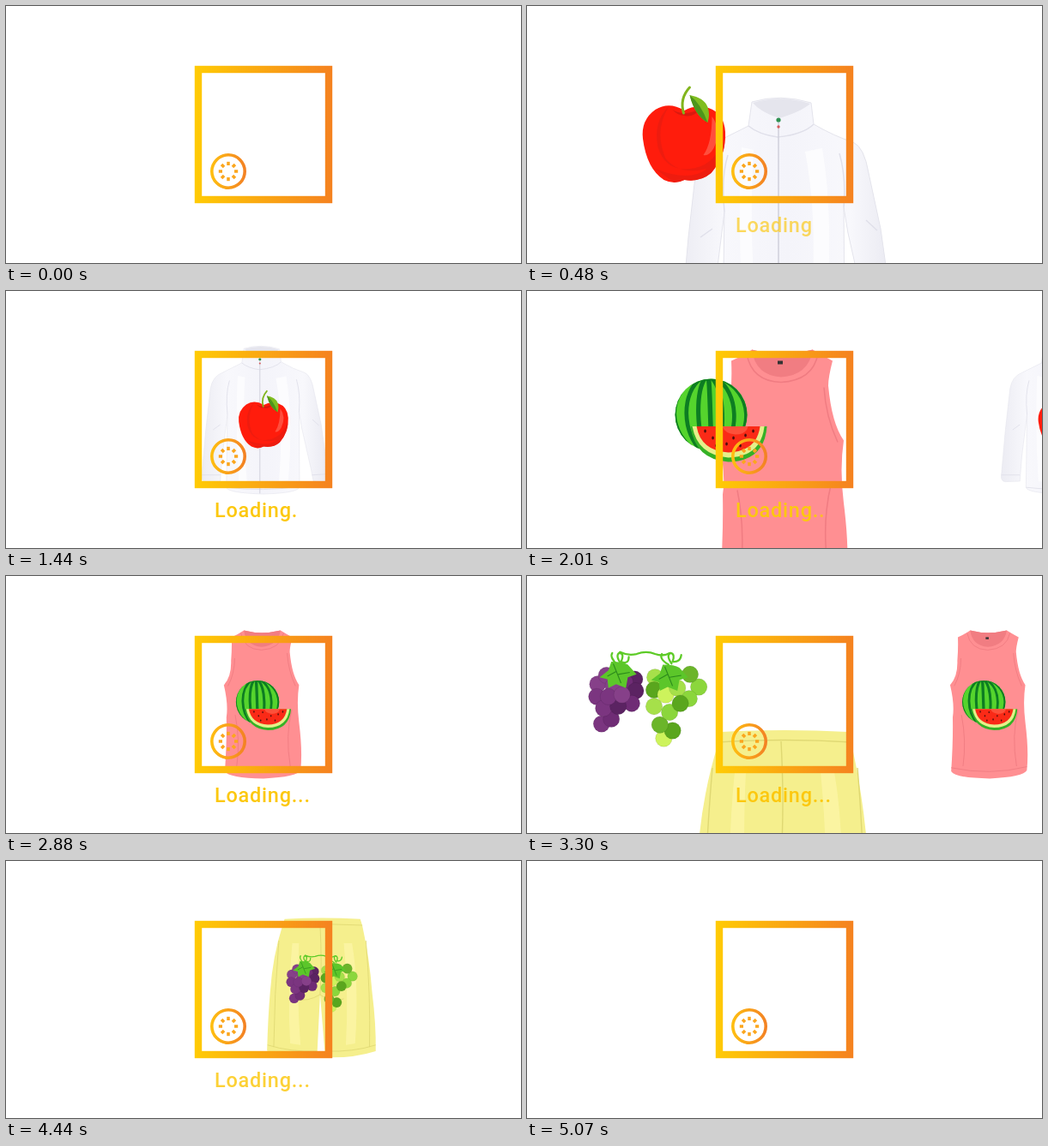
These frames come from a looping animation (600x300 px, 5.39 s). An HTML page:

```html
<!DOCTYPE html>
<html lang="en">
<head>
<meta charset="utf-8">
<title>Loading</title>
<style>
html, body { margin: 0; width: 100%; height: 100%; overflow: hidden; background: #fff; }
svg { display: block; width: 600px; height: 300px; }
text { font: 500 23.5px Roboto, "Open Sans", sans-serif; letter-spacing: .75px; fill: #fcc80f; }
</style>
</head>
<body>
<svg viewBox="0 0 600 300">
  <defs>
    <linearGradient id="gold" gradientUnits="userSpaceOnUse" x1="220" x2="380" y1="0" y2="0">
      <stop offset="0" stop-color="#ffcb05"/><stop offset="1" stop-color="#f58220"/>
    </linearGradient>
    <linearGradient id="ringGold" gradientUnits="userSpaceOnUse" x1="238" x2="280" y1="0" y2="0">
      <stop offset="0" stop-color="#ffc010"/><stop offset="1" stop-color="#f38024"/>
    </linearGradient>
    <linearGradient id="cloth">
      <stop offset="0" stop-color="#ececf3"/><stop offset=".2" stop-color="#f8f8fc"/>
      <stop offset=".5" stop-color="#f4f4fa"/><stop offset=".8" stop-color="#f8f8fc"/>
      <stop offset="1" stop-color="#e9e9f1"/>
    </linearGradient>
    <clipPath id="melonClip"><circle cx="215" cy="145" r="42"/></clipPath>
    <clipPath id="appleClip"><use href="#appleBody"/></clipPath>
  </defs>

  <!-- jacket and apple -->
  <g class="wear">
    <path fill="url(#cloth)" stroke="#e4e4ec" d="M-38-138Q-5-148 31-137L34-112Q58-98 80-91Q93-85 98-55L112 10 126 110Q127 119 118 121L97 120 92 95 74 15 69-15 70 130Q70 143 0 145Q-70 143-72 132L-70-10-80 70-84 120-112 121Q-121 120-120 110L-112 20-103-60Q-99-84-80-91L-42-110Z"/>
    <path fill="#e5e5ed" d="M-37-137Q-5-147 30-136Q20-127-6-119Q-28-126-37-137Z"/>
    <g fill="none" stroke="#e0e0ea" stroke-width="1.5">
      <path d="M-42-110Q-30-100-8-97Q22-100 34-112M-70-10Q-74-50-66-76M69-15Q72-50 64-78M-98 20-84 10M95 0 108 12M-72 132Q0 141 70 130M-120 108-84 108M94 108 126 106"/>
      <path stroke="#cfcfdb" d="M-7-117V144"/>
    </g>
    <path fill="#fff" opacity=".7" d="M-50-85Q-55 0-48 120L-32 122Q-42 10-36-82ZM24-80Q40 0 30 120L48 118Q58 0 44-84Z"/>
    <circle cx="-7" cy="-117" r="2.6" fill="#2e9050"/><circle cx="-7" cy="-109" r="1.7" fill="#d65a5a"/>
  </g>
  <g class="fruit"><g transform="translate(-183.5 -149.5)">
    <path id="appleBody" fill="#ff1c0c" d="M184 122Q166 111 150 121Q133 133 135.500 155Q140 190 160 203Q172 209 184 203Q202 206 215 195Q233 174 231.500 147Q230 125 212 119Q196 115 184 122Z"/>
    <g clip-path="url(#appleClip)">
      <path fill="#e91c10" opacity=".75" d="M166 117Q147 135 153 165Q162 193 190 190Q217 188 229 158L240 205 184 215 150 190Q190 206 210 190Q178 198 162 178Q148 145 166 117Z"/>
      <path fill="#ff5a4a" opacity=".8" d="M216 129Q228 145 218 166Q212 176 206 174Q216 160 216 129Z"/>
      <path fill="#c71710" opacity=".65" d="M170 121Q184 130 204 119Q194 131 184 128Q176 128 170 121Z"/>
    </g>
    <path fill="none" stroke="#82b51d" stroke-width="3" stroke-linecap="round" d="M183 125Q178 108 190 95"/>
    <path fill="#80bd20" d="M190 104Q207 107 211 118Q214 126 211 136Q196 128 190 104Z"/>
    <path fill="#4d951c" d="M190 104Q203 114 211 136Q196 128 190 104Z"/>
  </g></g>

  <!-- tank top and watermelon -->
  <g class="wear">
    <path fill="#ff8f92" d="M-62-131Q-48-137-38-144Q-4-135 33-144Q44-137 56-131Q51-112 51-102Q55-58 69-38Q64-5 69 35Q76 90 72 128Q66 141 0 144Q-68 143-75 130Q-71 70-72 25Q-68 0-77-38Q-62-54-63-85Q-61-110-62-131Z"/>
    <path fill="#f17d82" d="M-38-144Q-4-135 33-144Q28-114-4-112Q-34-114-38-144Z"/>
    <path fill="none" stroke="#f07c82" stroke-width="1.5" d="M-44-139Q-38-107-4-106Q33-108 39-139M-75 123Q0 139 72 121M-69-36Q-56-60-56-90M62-36Q48-66 46-100M-55 20Q-45 70-52 120M55 10Q42 60 52 120"/>
    <rect x="-8" y="-131" width="6" height="4" fill="#333"/>
  </g>
  <g class="fruit"><g transform="translate(-226.5 -151.5)">
    <circle cx="215" cy="145" r="42" fill="#55d42d"/>
    <g id="stripes" clip-path="url(#melonClip)" fill="none" stroke="#0d7d22"></g>
    <path fill="#35b126" d="M191 158.500H280Q277 199 235 200Q196 197 191 158.500Z"/>
    <path fill="#e5f08a" d="M193 158.500H277Q273 194 235 195Q199 192 193 158.500Z"/>
    <path fill="#fa2a17" d="M198 158.500H272Q268 188 235 189Q203 187 198 158.500Z"/>
    <path fill="#ff6b52" opacity=".6" d="M228 158.500H258Q256 168 243 168Q231 167 228 158.500Z"/>
    <g id="seeds" fill="#4a0e0c"></g>
  </g></g>

  <!-- shorts and grapes -->
  <g class="wear">
    <path fill="#f5ef8d" d="M-73-27Q0-31 74-27L78-14Q92 50 97 115Q105 180 104 230Q60 244 6 242L-4 120Q-7 180-10 242Q-60 243-107 229Q-105 160-101 115Q-96 45-77-14Z"/>
    <g fill="none" stroke="#dfd873" stroke-width="1.4">
      <path d="M-77-15Q0-20 78-15M-4-16Q0 60-4 120M-106 218Q-60 232-10 230M6 230Q60 232 104 218M-84 15Q-93 120-94 222M85 15Q94 120 92 222M-4 120Q-30 135-48 128M-4 120Q18 138 42 128"/>
    </g>
    <path fill="#fff9b0" opacity=".6" d="M-58 20Q-68 120-62 215L-42 218Q-50 120-45 20ZM42 20Q52 120 46 218L64 215Q72 100 58 20Z"/>
  </g>
  <g class="fruit"><g transform="scale(1.1325) translate(-300 -142)">
    <g fill="none" stroke="#5dcb27" stroke-width="2" stroke-linecap="round">
      <path d="M271 95Q279 99 288 97Q298 93 307 97Q316 100 322 96M268 108Q260 100 263 96M272 107Q266 99 270 96Q276 96 272 105Q280 108 280 100M321 108Q311 102 314 97M324 107Q318 98 323 96Q328 97 325 105Q333 106 334 98"/>
    </g>
    <g id="grapes"></g>
    <g id="leaf">
      <path fill="#5cc62a" d="M262 105Q274 105 279 108L288 118 279 121 277 132 267 128 259 132 258 123 250 121 259 114Z"/>
      <path fill="none" stroke="#2c8a1c" d="M264 107 272 127M267 115 258 120M269 118 281 116"/>
    </g>
    <use href="#leaf" x="53" y="3"/>
  </g></g>

  <g fill="none">
    <rect x="224" y="74" width="152" height="152" stroke="url(#gold)" stroke-width="8.400"/>
    <circle cx="259" cy="193" r="19.200" stroke="url(#ringGold)" stroke-width="3.600"/>
    <g id="spokes" stroke="#fba61d" stroke-width="3.500"></g>
  </g>
  <text id="label" x="243" y="264">Loading<tspan>.</tspan><tspan>.</tspan><tspan>.</tspan></text>
</svg>
<script>
const $ = id => document.getElementById(id);
const all = sel => [...document.querySelectorAll(sel)];

function add(parent, tag, attrs) {
  const el = document.createElementNS("http://www.w3.org/2000/svg", tag);
  for (const key in attrs) el.setAttribute(key, attrs[key]);
  $(parent).append(el);
}

for (let i = 0; i < 8; i++)
  add("spokes", "path", { d: "M259 181.800V186", transform: `rotate(${i * 45} 259 193)` });

for (let i = -3; i <= 3; i++)
  add("stripes", "path", {
    d: `M${212 + i * 4} 102C${214 + i * 17} 118 ${214 + i * 17} 168 ${216 + i * 5} 189`,
    "stroke-width": 5.5 - Math.abs(i) * 0.4
  });

[[208, 164], [217, 172], [225, 165], [233, 179], [241, 172], [249, 181], [255, 169], [264, 164], [221, 181]]
  .forEach(([cx, cy]) => add("seeds", "ellipse", { cx, cy, rx: 1.3, ry: 1.9 }));

function bunch(points, colors, r) {
  points.forEach(([cx, cy], i) => add("grapes", "circle", {
    cx, cy, r, fill: colors[i % colors.length], stroke: "#0002", "stroke-width": 0.6
  }));
}
bunch([[252, 169], [248, 128], [262, 164], [286, 123], [247, 141], [257, 119], [276, 126], [287, 135],
  [254, 153], [264, 130], [283, 148], [269, 151], [259, 141], [273, 139]],
  ["#7b3580", "#864089", "#6f2c75", "#5b2362"], 8.5);
bunch([[307, 121], [352, 131], [306, 134], [343, 118], [316, 184], [306, 151], [342, 143], [325, 176],
  [312, 170], [318, 139], [330, 132], [322, 157], [333, 148]],
  ["#a6e04a", "#8bd63c", "#5aa61e", "#6bb52a", "#cdf35c"], 8.6);

const STEP = 720, TICK = 30, LAST = 5070, LOOP = 5390;
const wears = all(".wear"), fruits = all(".fruit"), dots = all("tspan");
// resting heights, and how far each fruit travels in from the left
const looks = [
  { wearY: 150, fruitY: 149.5, run: 351 },
  { wearY: 150, fruitY: 151, run: 355 },
  { wearY: 84, fruitY: 142, run: 381 }
];
const RISE = 300, EXIT = 410, SHRINK = 0.4;

const part = (t, step) => Math.min(1, Math.max(0, t / STEP - step));
const place = (el, x, y, s) => el.setAttribute("transform", `translate(${x} ${y}) scale(${s})`);

function draw(t) {
  looks.forEach(({ wearY, fruitY, run }, i) => {
    const away = 1 - part(t, i * 2);
    const scale = 1 - SHRINK * part(t, i * 2 + 1);
    const x = 300 + EXIT * part(t, i * 2 + 2);
    place(wears[i], x, wearY + RISE * away, scale);
    place(fruits[i], x - run * away, fruitY, scale);
  });
  $("label").style.opacity = part(t, 0) - part(t, 6);
  dots.forEach((dot, i) => dot.style.fillOpacity = part(t, i + 1));
}

const begin = performance.now();
function frame() {
  const t = (performance.now() - begin) % LOOP;
  draw(Math.min(LAST, Math.floor(t / TICK) * TICK));
  requestAnimationFrame(frame);
}
frame();
</script>
</body>
</html>
```
